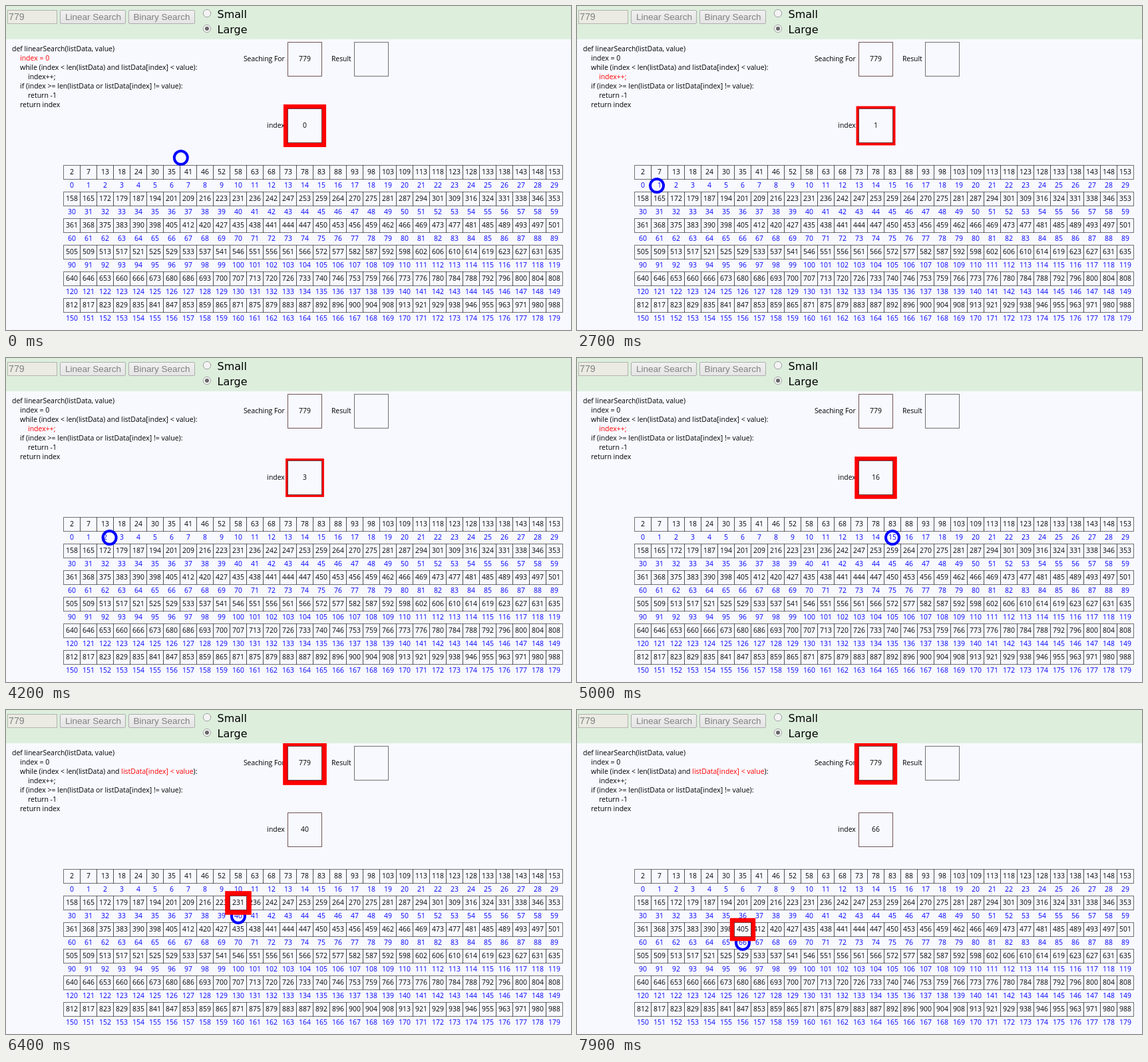
Write an HTML page that moves like this. It is 849 px wide and 487 px high and loops after 8 s.

```html
<!DOCTYPE html>
<html lang="en">
<head>
<meta charset="utf-8">
<title>Linear search</title>
<style>
  html, body { margin: 0; width: 100%; height: 100%; overflow: hidden; background: #f8f9ff; }
  svg { display: block; font: 10.4px "Open Sans", "Noto Sans", sans-serif; }
  #code { font-size: 10.5px; }
  .mid { text-anchor: middle; }
  .end { text-anchor: end; }
  .index { fill: #00f; }
  .box { fill: #f8f9ff; stroke: rgba(0, 0, 0, .55); }
  .on { fill: #f00; }
  .form { font: 13.5px "Liberation Sans", Arial, sans-serif; fill: #808080; }
  .radio { font: 16px "DejaVu Sans", Verdana, sans-serif; }
</style>
</head>
<body>
<svg width="849" height="487" viewBox="0 0 849 487">
  <defs>
    <linearGradient id="face" x2="0" y2="1">
      <stop offset="0" stop-color="#f1f1f1"/>
      <stop offset="1" stop-color="#e4e4e4"/>
    </linearGradient>
  </defs>
  <g id="code">
    <text x="9" y="68">def linearSearch(listData, value)</text>
    <text x="21" y="82" id="init">index = 0</text>
    <text x="21" y="96">while (index &lt; len(listData) and <tspan id="compare">listData[index] &lt; value</tspan>):</text>
    <text x="33" y="110" id="step">index++;</text>
    <text x="21" y="124">if (index &gt;= len(listData or listData[index] != value):</text>
    <text x="33" y="138">return -1</text>
    <text x="21" y="152">return index</text>
  </g>
  <g class="end">
    <text x="418.8" y="83">Seaching For</text>
    <text x="518.8" y="83">Result</text>
    <text x="418.8" y="183">index</text>
  </g>
  <g id="cells"></g>
  <circle id="ring" r="10" fill="none" stroke="#00f" stroke-width="4"/>
  <g id="boxes"></g>
  <g id="header">
    <rect width="849" height="50" fill="#ddeedd"/>
    <rect x="2.5" y="6.5" width="74" height="20" fill="#ebebe4" stroke="#b4b4ac"/>
    <text class="form" x="4" y="21" style="font-size:14.2px">779</text>
    <g fill="url(#face)" stroke="#adadad">
      <rect x="81.5" y="6.5" width="98" height="20" rx="1.5"/>
      <rect x="184.5" y="6.5" width="99" height="20" rx="1.5"/>
    </g>
    <text class="form mid" x="131" y="21">Linear Search</text>
    <text class="form mid" x="234" y="21">Binary Search</text>
    <g fill="#f4f4f4" stroke="#a2a2a2">
      <circle cx="302" cy="11" r="5.7"/>
      <circle cx="302" cy="34" r="5.7"/>
    </g>
    <circle cx="302" cy="34" r="3" fill="#666"/>
    <text class="radio" x="317.5" y="18">Small</text>
    <text class="radio" x="317.5" y="41">Large</text>
  </g>
</svg>
<script>
const LOOP = 8000, COLS = 30, COUNT = 180;
const FIRST = 860;   // first comparison, in ms
const FASTER = 2860; // the pace starts to pick up, in ms

// Every tenth value of the sorted list; the rest lie evenly between
const tens = [2, 58, 109, 158, 231, 287, 361, 435, 466, 505, 546, 598,
  640, 707, 773, 812, 871, 913, 997];

const $ = id => document.getElementById(id);
const mix = (a, b, p) => a + (b - a) * p;
const cellX = i => 99 + 25 * (i % COLS);
const cellY = i => 250 + 40 * Math.floor(i / COLS);

function valueAt(i) {
  const k = Math.floor(i / 10);
  return Math.floor(mix(tens[k], tens[k + 1], i % 10 / 10));
}

function set(el, attrs) {
  for (const key in attrs) el.setAttribute(key, attrs[key]);
}

function add(parent, tag, attrs, text = '') {
  const el = document.createElementNS('http://www.w3.org/2000/svg', tag);
  set(el, attrs);
  el.textContent = text;
  return parent.appendChild(el);
}

// A value box centred on its own origin, with a red frame behind it
function makeBox(parent, w, h, text, x, y) {
  const g = add(parent, 'g', {});
  const frame = add(g, 'rect', { fill: '#f00' });
  add(g, 'rect', { class: 'box', x: -w / 2, y: -h / 2, width: w, height: h });
  const label = add(g, 'text', { class: 'mid', y: 3.3 }, text);
  const box = {
    move(x, y) { set(g, { transform: `translate(${x} ${y})` }); },
    write(value) { label.textContent = value; },
    show(on) { set(g, { visibility: on ? 'visible' : 'hidden' }); },
    glow(d) {
      set(frame, { x: -w / 2 - d, y: -h / 2 - d, width: w + 2 * d, height: h + 2 * d });
    }
  };
  box.move(x, y);
  return box;
}

const bigBox = (text, x, y) => makeBox($('boxes'), 51, 51, text, x, y);
const smallBox = (parent, i) => makeBox(parent, 25, 21, valueAt(i), cellX(i), cellY(i));

for (let i = 0; i < COUNT; i++) {
  smallBox($('cells'), i);
  add($('cells'), 'text', { class: 'mid index', x: cellX(i), y: cellY(i) + 23.3 }, i);
}
const target = bigBox('779', 449, 80);
const counter = bigBox('0', 449, 180);
bigBox('', 549, 80);
const probe = smallBox($('boxes'), 0);

// Even steps compare, odd steps advance: one per second, speeding up to full pace
function stepAt(t) {
  const u = Math.max(0, t - FASTER) / 1000;
  const slow = (t - FIRST) / 1000 + 1.07 * u * u;
  const fast = 31 + 0.035 * (t - 5000);
  return { s: Math.max(slow, fast), smooth: slow > fast };
}

// Frame thickness: triangle wave with its low point at 4200 ms
function pulse(t) {
  const p = Math.abs(t - 4200) / 488 % 1;
  return 3.4 + 8 * Math.min(p, 1 - p);
}

function draw(t) {
  const { s, smooth } = stepAt(t);
  const n = Math.floor(s + 1e-6);
  const starting = n < 0;
  const comparing = !starting && n % 2 === 0;
  const advancing = !starting && !comparing;
  const at = Math.max(0, Math.floor(n / 2));
  const d = pulse(t);

  $('init').classList.toggle('on', starting);
  $('compare').classList.toggle('on', comparing);
  $('step').classList.toggle('on', advancing);

  target.glow(comparing ? d : 0);
  counter.glow(comparing ? 0 : d);
  counter.write(at + (advancing ? 1 : 0));
  probe.show(comparing);
  probe.glow(d);
  probe.write(valueAt(at));
  probe.move(cellX(at), cellY(at));

  let x = cellX(at), y = cellY(at) + 20;
  if (starting) {
    x = mix(263, x, t / FIRST);
    y = mix(228, y, t / FIRST);
  } else if (advancing && smooth) {
    x = mix(x, cellX(at + 1), s - n);
  }
  set($('ring'), { cx: x, cy: y });
}

const start = performance.now();
function tick() {
  draw((performance.now() - start) % LOOP);
  requestAnimationFrame(tick);
}
tick();
</script>
</body>
</html>
```
